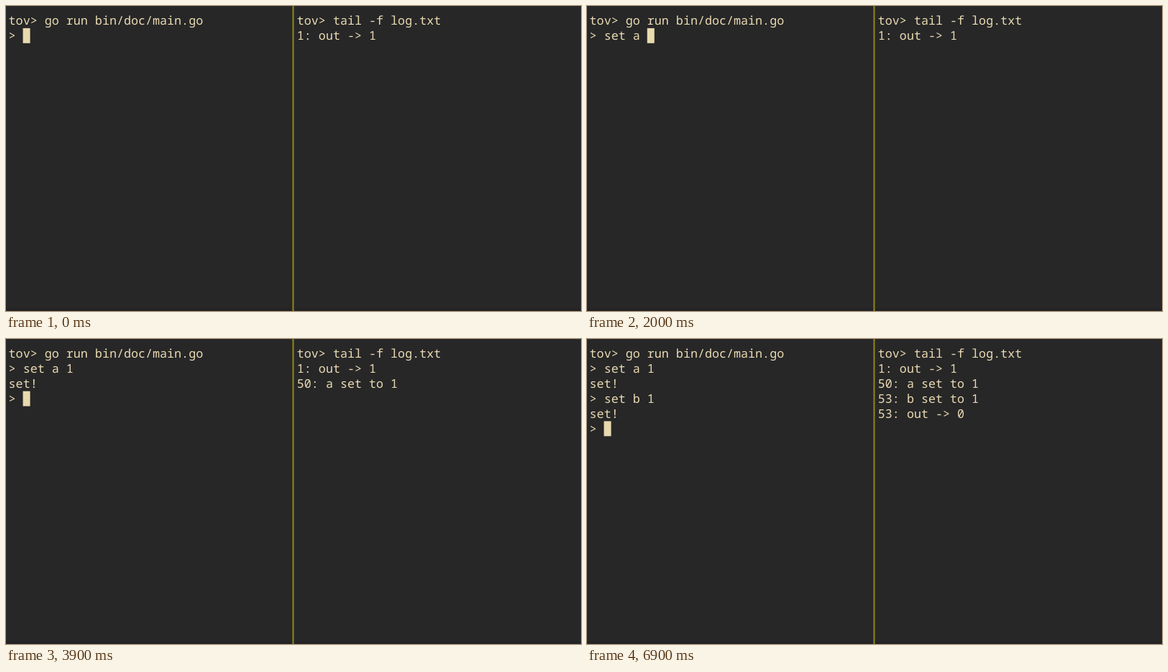
Write an HTML page that moves like this. It is 800 by 425 pixels and loops after 8 s.

```html
<!DOCTYPE html>
<html lang="en">
<head>
<meta charset="utf-8">
<title>Terminal session</title>
<style>
  html, body { margin: 0; width: 100%; height: 100%; overflow: hidden; }
  body { position: relative; background: #272728; }
  pre, svg { position: absolute; }
  svg { left: 0; top: 0; }
  pre {
    margin: 0; top: 10.2px; color: #ebdbb2;
    font: 16.72px/20.9px "Noto Sans Mono", "DejaVu Sans Mono", monospace;
    font-variant-ligatures: none;
    text-rendering: geometricPrecision;
  }
  #shell { left: 3.6px; }
  #log { left: 404.8px; }
</style>
</head>
<body>
<svg width="800" height="425">
  <rect y="421" width="800" height="4" fill="#232325"/>
  <rect x="398.5" width="2" height="425" fill="#8f8814"/>
  <rect id="cursor" width="10" height="20.9" fill="#e9daae"/>
</svg>
<pre id="shell"></pre>
<pre id="log"></pre>
<script>
const LOOP = 8000, CELL_W = 10.03, CELL_H = 20.9, LEFT = 3.5, TOP = 10;
const [shell, log, cursor] = ["shell", "log", "cursor"].map(id => document.getElementById(id));

// Each entry: time in ms, text that appears from then on
const typed = [
  [0, "tov> go run bin/doc/main.go\n> "],
  [1300, "se"], [1400, "t"], [1500, " "], [1700, "a"], [2000, " "], [2800, "1"],
  [3200, "\nset!\n> "],
  [5700, "se"], [5800, "t"], [5900, " "], [6300, "b"], [6400, " "], [6500, "1"],
  [6800, "\nset!\n> "]
];
const logged = [
  [0, "tov> tail -f log.txt\n1: out -> 1"],
  [3900, "\n50: a set to 1"],
  [6900, "\n53: b set to 1\n53: out -> 0"]
];

const textAt = (events, t) =>
  events.filter(([start]) => start <= t).map(([, text]) => text).join("");

function draw(now) {
  const t = now % LOOP;
  const text = textAt(typed, t);
  const lines = text.split("\n");
  shell.textContent = text;
  log.textContent = textAt(logged, t);
  cursor.setAttribute("x", LEFT + lines.at(-1).length * CELL_W);
  cursor.setAttribute("y", TOP + (lines.length - 1) * CELL_H);
}

const start = performance.now();
function frame() {
  draw(performance.now() - start);
  requestAnimationFrame(frame);
}
frame();
</script>
</body>
</html>
```
